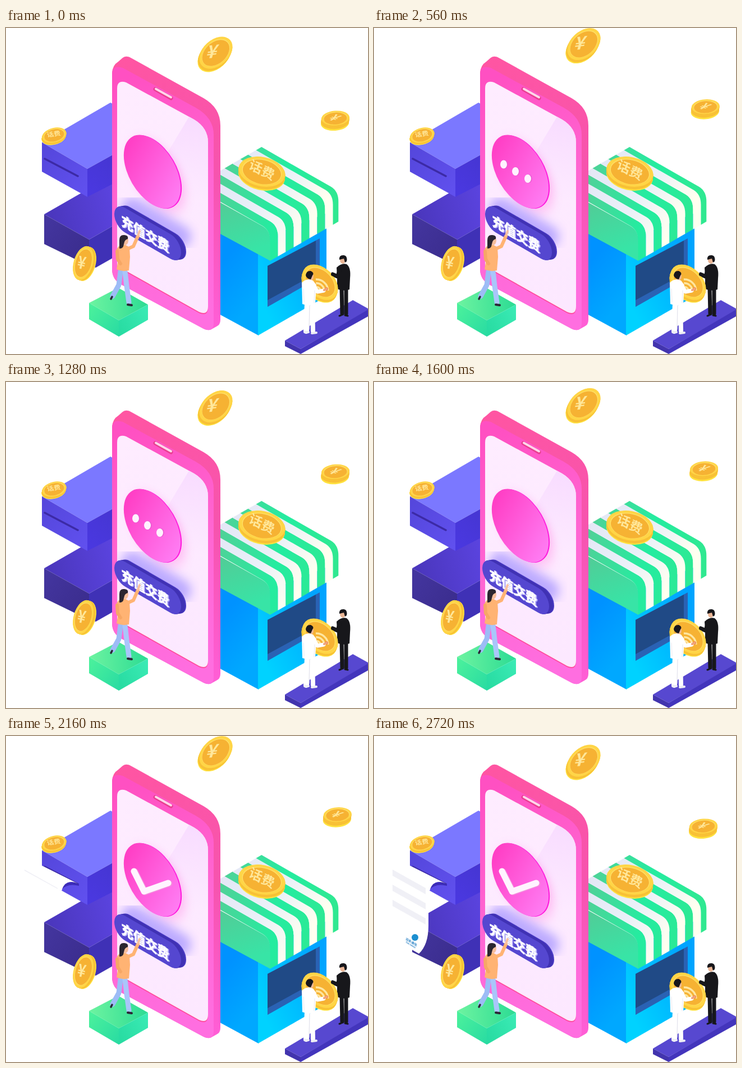
Recreate the animation shown at these times as an HTML page. Size 645 px wide and 581 px high, loop 2800 ms.

```html
<!DOCTYPE html>
<html lang="zh">
<head>
<meta charset="utf-8">
<title>充值交费</title>
<style>
html, body { margin: 0; width: 100%; height: 100%; overflow: hidden; background: #fff; }
svg { display: block; width: 645px; height: 581px; }
text { font-family: "Noto Sans CJK SC", "Noto Sans CJK", sans-serif; font-weight: 700; text-anchor: middle; }
</style>
</head>
<body>
<svg id="stage" viewBox="0 0 645 581" xmlns="http://www.w3.org/2000/svg"></svg>
<script>
const LOOP = 2800, STEP = 80, BOB = 1360;
const stage = document.getElementById('stage');

const path = (d, fill, extra = '') => `<path d="${d}" fill="${fill}" ${extra}/>`;
const poly = (pts, fill) => `<polygon points="${pts}" fill="${fill}"/>`;
const line = (d, color, w, extra = '') =>
  `<path d="${d}" fill="none" stroke="${color}" stroke-width="${w}" stroke-linecap="round" stroke-linejoin="round" ${extra}/>`;
const group = (id, body, extra = '') => `<g id="${id}" ${extra}>${body}</g>`;
const grad = (id, x1, y1, x2, y2, ...colors) =>
  `<linearGradient id="${id}" gradientUnits="userSpaceOnUse" x1="${x1}" y1="${y1}" x2="${x2}" y2="${y2}">` +
  colors.map((c, i) => `<stop offset="${i / (colors.length - 1)}" stop-color="${c}"/>`).join('') +
  '</linearGradient>';
// Wall plane that runs down to the right
const iso = (x, y) => `transform="matrix(.866 .5 0 1 ${x} ${y})"`;

// Thick disc: rim swept along (dx, dy), face on top, glyph drawn with its own matrix
function coin(x, y, rx, ry, rot, dx, dy, glyph) {
  const disc = (cx, cy, k, fill) =>
    `<ellipse cx="${cx}" cy="${cy}" rx="${rx * k}" ry="${ry * k}" transform="rotate(${rot} ${cx} ${cy})" fill="${fill}"/>`;
  let s = '';
  for (let i = 10; i > 0; i--) s += disc(x + dx * i / 10, y + dy * i / 10, 1, i > 7 ? '#ffe23f' : '#f8c136');
  return s + disc(x, y, 1, '#ffd546') + disc(x, y, .85, '#ffe069') +
    disc(x + dx * .08, y + dy * .08, .82, '#f6b233') + glyph;
}
const glyph = (s, size, m, x, y) =>
  `<text transform="matrix(${m} ${x} ${y})" y="${size * .36}" font-size="${size}" fill="#ffe79a">${s}</text>`;

const defs = `<defs>
${grad('boxL', 64, 220, 145, 290, '#5547dc', '#6050ee')}
${grad('boxR', 145, 290, 190, 240, '#4a38e0', '#4636d4')}
${grad('lowT', 80, 330, 190, 300, '#4b37be', '#5a43de')}
${grad('lowL', 68, 350, 148, 410, '#43359e', '#3a2c8c')}
${grad('greenT', 150, 490, 250, 490, '#6cf3a0', '#2edc94')}
${grad('greenL', 148, 500, 201, 545, '#4af09c', '#2adca2')}
${grad('greenR', 201, 535, 253, 505, '#28dca2', '#3aeab4')}
${grad('face', 190, 100, 370, 500, '#ff50c2', '#ff66d2', '#ff6ee0')}
${grad('edge', 215, 50, 376, 530, '#ff55a2', '#f654ae', '#ff5ed6')}
${grad('screen', 210, 110, 340, 500, '#feecff', '#fdeaff', '#fce8ff')}
${grad('shine', 330, 160, 300, 300, '#f8dcff', '#f8dcff00')}
${grad('disc', -50, -20, 50, 30, '#ff40c6', '#ff7cf3')}
${grad('wallL', 382, 420, 450, 480, '#0092ff', '#00a8ff')}
${grad('wallR', 450, 480, 571, 420, '#00d2ff', '#00a4ff')}
${grad('awnL', 400, 315, 430, 400, '#4fce98', '#38e4a6')}
${grad('awnG', 382, 280, 592, 330, '#4ed298', '#24eca0', '#30e890')}
${grad('awnW', 400, 250, 540, 350, '#e4e8f6', '#eaf0f8', '#fffff0')}
<filter id="blur" x="-40%" y="-40%" width="180%" height="180%"><feGaussianBlur stdDeviation="9"/></filter>
<clipPath id="roof"><rect x="382" y="200" width="220" height="230"/></clipPath>
<clipPath id="scr"><path id="scrShape" d="M198 108Q198 92 214 97L335 163Q360 178 360 204V496Q360 513 344 506L198 424Z"/></clipPath>
<clipPath id="feed"><polygon id="feedShape"/></clipPath>
</defs>`;

const boxes =
  poly('68,332 190,262 190,353 148,377', 'url(#lowT)') +
  poly('68,332 148,377 148,424 68,385', 'url(#lowL)') +
  poly('148,377 190,353 190,410 160,427 148,424', '#3f31b6') +
  poly('64,204 186,133 190,135 190,226 145,251', '#7b78ff') +
  poly('64,204 145,251 145,301 64,256', 'url(#boxL)') +
  poly('145,251 190,226 190,278 145,301', 'url(#boxR)') +
  line('M69 233L128 264', '#3c2aa6', 3.5);

const band = y => poly(`33,${y} 92,${y + 33} 92,${y + 44} 33,${y + 11}`, '#f0f0f6');
const paper = group('paper',
  path('M128 263Q105 252 97 282V338Q97 372 80 388L6 345Q33 335 33 310V252Q38 222 64 231Z', '#fff') +
  path('M130 265Q107 253 100 273Q110 262 130 267Z', '#3c2cb8') +
  [238, 265, 292].map(band).join('') +
  '<circle cx="73" cy="359" r="6" fill="#1c8fd0"/>' +
  '<g transform="matrix(.82 .5 -.2 .9 66 369)" fill="#2c84c6">' +
  '<text font-size="6">远禾通信</text><text y="5" font-size="4">FAR GRAIN</text></g>',
  'clip-path="url(#feed)"');

// Awning seam k, from front lip up over the curve to the back edge
function seam(k) {
  const x = 470.5 + Math.min(k, 8.7) * 14, y = 415 - (x - 470.5) * .574;
  return [[x, y], [x, y - 36], [x, y - 54], [x - 13, y - 62], [x - 137, y - 133]].map(p => p.map(n => n.toFixed(1)).join(' '));
}
function stripe(k) {
  const a = seam(k), b = seam(k + 1);
  return path(`M${a[0]}L${a[1]}Q${a[2]} ${a[3]}L${a[4]}L${b[4]}L${b[3]}Q${b[2]} ${b[1]}L${b[0]}Z`,
    k % 2 ? 'url(#awnW)' : 'url(#awnG)');
}
const shop =
  poly('380,340 450,380 450,548 380,510', 'url(#wallL)') +
  poly('449,380 571,330 571,478 449,548', 'url(#wallR)') +
  poly('466,424 559,375 559,444 466,497', '#2a62b4') +
  poly('466,424 552,379 552,438 466,485', '#204a86') +
  '<g clip-path="url(#roof)">' +
  path('M380 310L457 353Q471 361 471 379V415L380 366Z', 'url(#awnL)') +
  Array.from({ length: 9 }, (_, k) => stripe(k)).join('') + '</g>';

const discRim = `<circle r="58.5" ${iso(262.5, 256.5)} fill="#ff18dc"/>`;
const dots = [[231, 243], [252, 255.5], [274, 268.5]].map(([x, y], i) =>
  group('dot' + i, `<ellipse cx="${x + 1}" cy="${y}" rx="6.6" ry="8" fill="#e85ad0"/>` +
    `<ellipse cx="${x}" cy="${y}" rx="6" ry="7.6" fill="#fff2ff"/>`)).join('');
const tick = 'M228 241L246 277L289 262';
const check = group('check',
  line(tick, '#f48adc', 11, 'pathLength="100" stroke-dasharray="100 200" transform="translate(2 1)"') +
  line(tick, '#fff4ff', 11, 'pathLength="100" stroke-dasharray="100 200"'));

const phone =
  path('M189 80Q190 66 200 60L208 53Q215 48 224 54L352 125Q382 142 382 174V520Q382 529 375 532L366 537Q361 540 352 536L205 457Q189 448 189 430Z', 'url(#edge)') +
  path('M189 82Q189 65 208 71L338 142Q370 160 370 190V526Q370 542 354 537L205 457Q189 448 189 430Z', 'url(#face)') +
  path('M198 108Q198 92 214 97L335 163Q360 178 360 204V496Q360 513 344 506L198 424Z', '#ff4c9c', 'transform="translate(0 2)"') +
  '<use href="#scrShape" fill="url(#screen)"/>' +
  '<g clip-path="url(#scr)">' + poly('328,155 365,175 365,330 258,272', 'url(#shine)') +
  `<circle r="58" ${iso(270, 264)} fill="#ff7fe0" opacity=".4" filter="url(#blur)"/>` +
  line('M225 322L310 372', '#7c6cff', 40, 'opacity=".5" filter="url(#blur)"') + '</g>' +
  line('M266 109L294 125', '#e93f90', 7) + line('M267 108.5L294 123.5', '#ffd6ea', 4) +
  discRim + `<circle r="58.5" ${iso(260.5, 256)} fill="url(#disc)"/>` + dots + check;

const pill = (dx, dy, fill) =>
  `<rect x="-22" y="-22" width="137.5" height="44" rx="22" ${iso(212 + dx, 342.5 + dy)} fill="${fill}"/>`;
const label = (dx, dy, fill) =>
  `<text ${iso(248 + dx, 367.5 + dy)} y="8.5" font-size="24.5" fill="${fill}" stroke="${fill}" stroke-width=".7">充值交费</text>`;
const button = group('button',
  [9, 7, 5, 3, 1].map(d => pill(d, -d * .15, d > 7 ? '#4a3ac4' : '#4032b4')).join('') +
  pill(0, 0, '#5547d0') + label(2, 1, '#b3abfa') + label(0, 0, '#fff'));

const plinth =
  poly('148,490 200,463 253,493 201,521', 'url(#greenT)') +
  poly('148,490 201,521 201,550 148,519', 'url(#greenL)') +
  poly('201,521 253,493 253,520 201,550', 'url(#greenR)');

const woman =
  line('M204 434L201 458L190 478', '#9dbcf6', 9) + line('M212 434L215 460L219 489', '#a9c6fa', 9) +
  line('M189 479L187 483', '#2b2735', 3.5) + line('M217 493L224 494', '#2b2735', 4) +
  path('M200 390Q209 382 220 391L221 408L219 432Q207 435 197 430L200 412Q192 400 200 390Z', '#ffb373') +
  line('M216 394L227 389L235 371', '#ffb373', 6) + line('M235 370L238 362', '#f8c0a0', 4) +
  line('M198 398L199 412L204 420', '#f6a765', 6) +
  '<ellipse cx="212" cy="379" rx="6" ry="8" fill="#f6bd9c"/>' +
  path('M202 378Q202 368 211 369Q219 370 217 376Q211 377 210 385Q209 394 202 393Z', '#2b2530');

const ramp =
  poly('497,557 618,485 645,500 645,503 525,572', '#5748d0') +
  poly('497,557 525,572 525,581 497,567', '#4234ae') +
  poly('525,572 645,502 645,514 525,581', '#4335bc');

const waves = [9, 17, 25].map(r =>
  `<path d="M${-r * .7} ${-r * .7}A${r} ${r} 0 0 1 ${r * .7} ${-r * .7}" fill="none" stroke="#ffe6a0" stroke-width="4" transform="translate(553 469) rotate(42) scale(.85)"/>`).join('');
const carried = group('carried', coin(560, 453, 37, 25, 45, -2, 5, waves + '<circle cx="571" cy="465" r="3" fill="#f08a4a"/>'));

const dark = '#17171b';
const guest =
  line('M598 464L599 509', dark, 7) + line('M606 464L606 509', dark, 7) +
  line('M597 512L594 513', dark, 3) + line('M604 512L609 513', dark, 3) +
  path('M589 427Q598 418 607 421Q615 427 613 446L612 466Q601 470 590 465L590 442Z', dark) +
  group('arm', line('M594 432L591 443L582 439', dark, 7)) +
  '<ellipse cx="600" cy="413" rx="5" ry="7" fill="#e9b595"/>' +
  path('M594 413Q593 404 602 405Q609 406 607 416L604 418L602 411Z', dark);
const clerk =
  line('M537 490L535 540', '#fff', 10) + line('M546 490L547 540', '#fff', 8) +
  line('M541 495L540 537', '#e2e2ec', 1.2) +
  line('M532 542L539 542', '#ededf4', 4) + line('M545 544L553 543', '#ededf4', 4) +
  '<ellipse cx="543" cy="443" rx="5" ry="7" fill="#efb894"/>' +
  path('M527 454Q535 445 547 450L553 458L551 492Q540 496 528 492Z', '#fff') +
  line('M547 458L555 470L566 468', '#fff', 7) + line('M567 467L571 465', '#f0a37c', 4) +
  line('M550 468L549 490M530 465L531 488', '#e9e9f1', 1) +
  path('M534 441Q535 432 543 433Q550 436 546 441L543 448Q536 447 534 441Z', '#18171c');

stage.innerHTML = defs + boxes + paper + shop + phone + button + plinth + woman + ramp + guest + carried +
  group('armTop', line('M590 443L582 439', dark, 6)) + clerk +
  coin(86, 191, 22, 13, -14, -1, 4, glyph('话费', 13, '.92 -.14 .2 .8', 85, 189)) +
  coin(137.5, 419, 17, 31, 16, 5, 1.5, glyph('¥', 32, '.75 .16 -.2 .95', 135, 418)) +
  coin(456, 256, 42, 26, 12, -.5, 7, glyph('话费', 25, '.87 .44 -.3 .86', 456, 253)) +
  group('coinTop', coin(374, 44, 34, 23, -42, -3, 6, glyph('¥', 37, '.88 -.1 -.25 .88', 368, 42))) +
  group('coinRight', coin(587, 160.5, 25, 13, -4, -1, 9.5, glyph('¥', 31, '.66 .2 -.66 .42', 586, 160)));

const el = id => document.getElementById(id);
const move = (id, x, y) => el(id).setAttribute('transform', `translate(${x.toFixed(2)} ${y.toFixed(2)})`);
const show = (id, on) => { el(id).style.display = on ? '' : 'none'; };
const hump = (t, mid, half) => Math.max(0, 1 - Math.abs(t - mid) / half);
const ticks = el('check').children;

function draw(t) {
  const c = Math.cos(t / BOB * 2 * Math.PI);
  move('coinTop', 0, 8.3 * (c - 1));
  move('coinRight', 2 * (1 - c), 11 * (c - 1));
  move('button', 5 * hump(t, 560, 240), 0);

  for (let i = 0; i < 3; i++) show('dot' + i, t >= 400 + i * STEP && t < 1360);
  const drawn = Math.min(1, (t - 1680) / 320);
  show('check', drawn > 0);
  for (const s of ticks) s.setAttribute('stroke-dashoffset', 100 * (1 - Math.max(0, drawn)));

  const pull = hump(t, 1040, 240);
  move('carried', -3.5 * pull, -2 * pull);
  move('arm', -3 * pull, -.5 * pull);
  move('armTop', -3 * pull, -.5 * pull);

  // The printed edge slides down parallel to the slot
  const y = 272 + .33 * (t - 2160);
  show('paper', t >= 2080);
  el('feedShape').setAttribute('points', `0,180 140,200 140,${y + 27} 0,${y - 50}`);
}

const start = performance.now();
function tickFrame() {
  const t = (performance.now() - start) % LOOP;
  draw(Math.floor(t / STEP) * STEP);
  requestAnimationFrame(tickFrame);
}
draw(0);
requestAnimationFrame(tickFrame);
</script>
</body>
</html>
```
